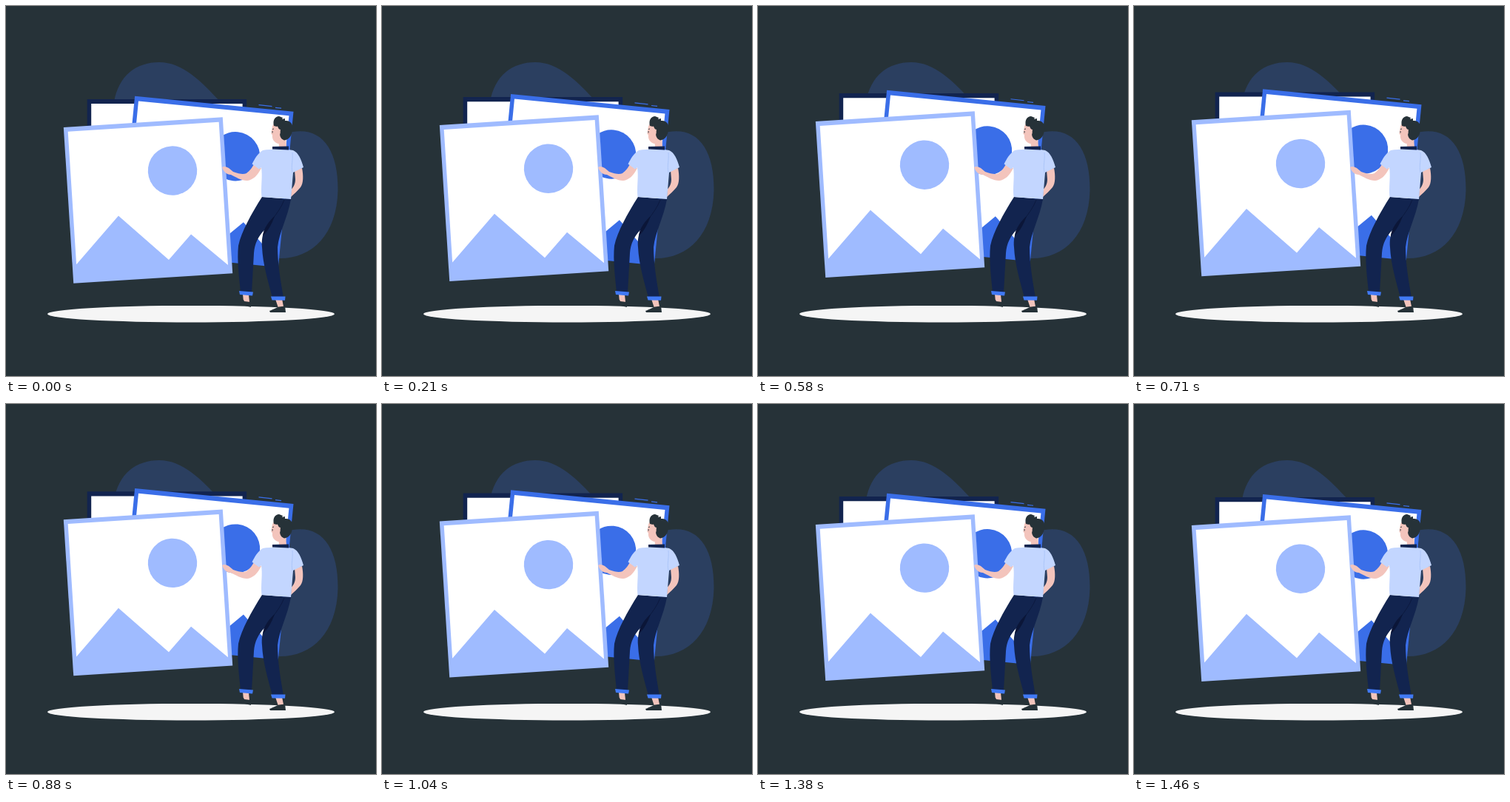
Recreate the animation shown at these times as an HTML page with a canvas. Size 500 by 500 pixels, loop 1.5 s.

```html
<!DOCTYPE html>
<html lang="en">
<head>
<meta charset="utf-8">
<title>Picture gallery</title>
<style>
  html, body { margin: 0; width: 100%; height: 100%; overflow: hidden; background: #263238; }
  canvas { display: block; width: 500px; height: 500px; }
</style>
</head>
<body>
<canvas id="stage" width="500" height="500"></canvas>
<script>
const ctx = document.getElementById('stage').getContext('2d');
const LOOP = 1500;
const STEPS = 36;

const C = {
  ground: '#263238', blob: '#2b3f60', floor: '#f5f5f5', white: '#ffffff',
  pale: '#9fbbff', blue: '#3a6ee8', navy: '#12244f', fold: '#0b1638',
  cuff: '#4079f5', skin: '#f3c4bc', shirt: '#c3d6ff', seam: '#a3bff5'
};

function fill(d, color) {
  ctx.fillStyle = color;
  ctx.fill(new Path2D(d));
}

function stroke(d, color, width) {
  ctx.strokeStyle = color;
  ctx.lineWidth = width;
  ctx.stroke(new Path2D(d));
}

function ellipse(x, y, rx, ry, color) {
  ctx.fillStyle = color;
  ctx.beginPath();
  ctx.ellipse(x, y, rx, ry, 0, 0, 2 * Math.PI);
  ctx.fill();
}

function card(x, y, degrees, color) {
  ctx.save();
  ctx.translate(x, y);
  ctx.rotate(degrees * Math.PI / 180);
  fill('M-107.7-105.7H107.7V105.7H-107.7Z', color);
  fill('M-102.2-99.5H102.2V94.2L55 49.6 22.8 82.1-41.3 18.4-102.2 80.4Z', C.white);
  ellipse(35.5, -37.8, 33.2, 33.2, color);
  ctx.restore();
}

function backdrop() {
  ctx.fillStyle = C.ground;
  ctx.fillRect(0, 0, 500, 500);
  fill('M146 130C152 94 176 76 207 76C239 76 264 102 290 130C322 163 350 172 388 170C427 164 449 194 448.500 249C447 309 414 341 370 341C280 341 140 260 146 130Z', C.blob);
  ellipse(250, 416.200, 194, 11.300, C.floor);
}

function pictures(lift) {
  ctx.save();
  ctx.translate(0, lift);
  card(217.4, 231.9, 0, C.navy);
  stroke('M341.500 133.900L359.500 135.900M364 137.600L372 138.500', C.blue, 1.2);
  card(271, 237.7, 5.6, C.blue);
  card(192, 262.8, -3.65, C.pale);
  ctx.restore();
}

function legs() {
  fill('M320 389L328 390 329 400H321Z', C.skin);
  fill('M364 396L373 396 375 406 368 408Z', C.skin);
  fill('M316.500 396.500L321 397 322 399 330 400 331 407 316.500 403.500Z', C.ground);
  fill('M356 412C362 410 366 407 369 406.500L377 405.500 378 414H357Z', C.ground);
  fill('M346 258L385 261C381 285 369 306 367 326C367 348 371 371 375 394H360C354 371 347 349 346 326C345 316 347 309 349 303C341 311 336 321 335 334L332 387 317 386.500C315 366 312 343 314 324C318 305 332 280 346 258Z', C.navy);
  fill('M363 284C356 290 348 300 347 311C354 304 359 295 363 284Z', C.fold);
  stroke('M376 262C372 272 367 279 360 288', C.fold, 0.7);
  fill('M315 385L334 386.500 333 391.500 316 390Z', C.cuff);
  fill('M358 392.500L377.500 392.500 377 397.800 359.500 397.500Z', C.cuff);
}

function torso() {
  fill('M390 222L400 219C402 229 402 240 398 245C394 250 389 254 385 258L385.500 248C389 244 391 240 391 234Z', C.skin);
  fill('M335 214L345 219C340 229 334 235 326 236C318 236 310 231 304 228C298 228 295 224 292.500 219.500C291 216 297 216.500 301 219L307 224C315 227 321 228 325 226C330 222 332 219 335 214Z', C.skin);
  fill('M347 195C359 193 375 193 388 195C395 198 399 207 402 218L388 225 385 261 345.500 258C344 245 347 231 345 218L342 220.500 332.500 213.500C336 207 340 199 347 195Z', C.shirt);
  stroke('M387 198C388 208 385 216 387 225', C.seam, 0.7);
}

function head() {
  fill('M368 179L378 177 379 191H369Z', C.skin);
  fill('M360 190L382 189.500 382 194.500 360 193.500Z', C.navy);
  fill('M361 160C359 165 359 169 358.500 173L360 174C359 180 363 185 368 186C374 186 378 180 379 174L376 158Z', C.skin);
  fill('M362 162C360 154 364 149 369 149L374 151 373 153 377 152 377 155C384 154 389 160 387 168C386 176 382 181 376 181.500C372 180 370 177 370 172L371 167C367 167 368 161 366 163Z', C.ground);
  ellipse(368.300, 171, 2.300, 3.300, C.skin);
  stroke('M360 166.500L362 166M360 169V171.500', C.ground, 0.9);
}

function draw(now) {
  // The cards advance in discrete steps; the bias absorbs 10 ms rounding of step times.
  const step = Math.floor((now % LOOP) / LOOP * STEPS + 0.2) % STEPS;
  const lift = 0.56 * Math.abs(step - 17.35) - 10;
  backdrop();
  pictures(lift);
  legs();
  torso();
  head();
}

const start = performance.now();
function tick() {
  draw(performance.now() - start);
  requestAnimationFrame(tick);
}
tick();
</script>
</body>
</html>
```
